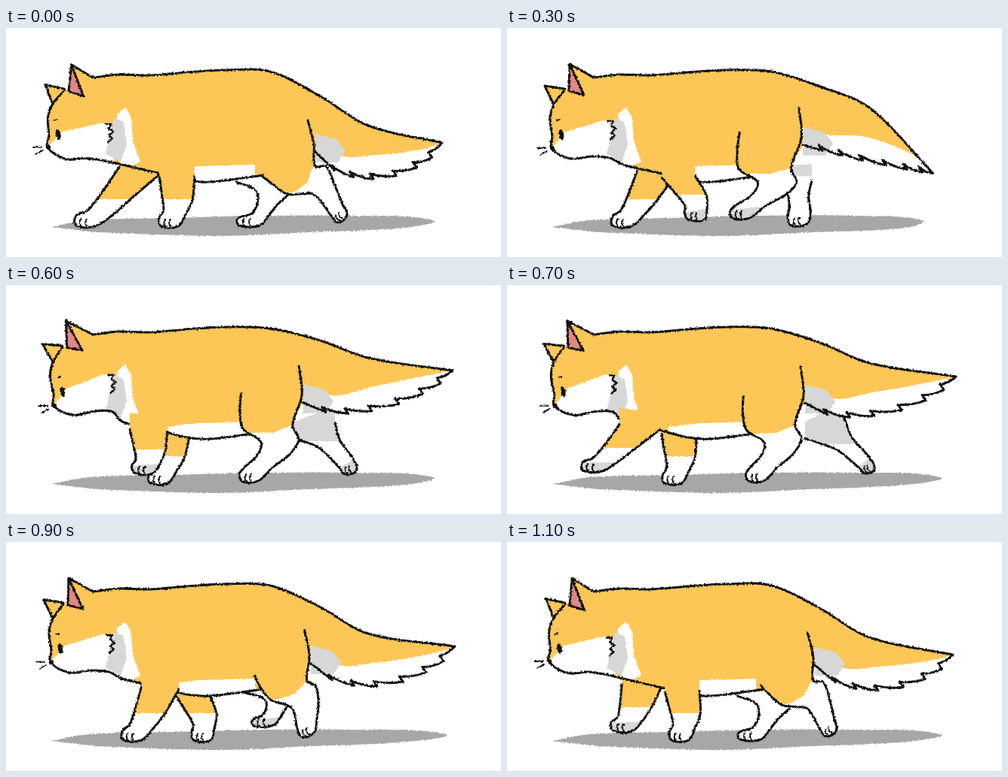
These frames come from a looping animation (656x305 px, 1.2 s). An HTML page:

```html
<!DOCTYPE html>
<html lang="en">
<head>
<meta charset="utf-8">
<title>Walk cycle</title>
<style>
html, body { margin: 0; width: 100%; height: 100%; overflow: hidden; background: #fff; }
svg { display: block; }
</style>
</head>
<body>
<svg width="656" height="305" viewBox="0 0 656 305">
  <filter id="crayon" x="0" y="0" width="656" height="305" filterUnits="userSpaceOnUse" color-interpolation-filters="sRGB">
    <feTurbulence id="grain" type="fractalNoise" baseFrequency=".4" numOctaves="2"/>
    <feDisplacementMap in="SourceGraphic" scale="3.5" xChannelSelector="R" yChannelSelector="G"/>
  </filter>
  <g id="stage" filter="url(#crayon)"></g>
</svg>
<script>
const ORANGE = '#fdc757', GREY = '#d7d7d8', PINK = '#e08886', SHADOW = '#a7a7a7', INK = '#111';
const STEPS = 12, STEP_MS = 100;

const parse = s => s.split(' ').map(p => p.split(',').map(Number));
const lerp = (a, b, k) => a.map((v, i) => v + (b[i] - v) * k);
const last = list => list[list.length - 1];
const move = ([x, y], dx, dy) => [x + dx, y + dy];
const clamp = v => Math.max(0, Math.min(1, v));

// Values at the key steps; a step between two keys takes their mean.
const KEYS = [0, 2, 4, 6, 7, 9, 11];
function track(values, step) {
  const i = KEYS.findLastIndex(k => k <= step);
  return KEYS[i] === step ? values[i] : (values[i] + values[i + 1]) / 2;
}

// Each leg blends a reaching and a trailing outline: down the front, round the paw, up the back.
const FRONT = {
  reach: parse('150,185 130,215 108,243 93,250 93,263 118,264 140,250 165,228 203,195'),
  trail: parse('224,203 236,222 248,243 246,254 249,264 271,264 276,248 279,229 268,199'),
  paw: 3, fold: 2
};
const FAR_HIND = {
  reach: parse('305,205 332,218 328,245 307,254 309,263 336,263 348,250 360,235 374,222'),
  trail: parse('395,208 425,220 440,228 466,254 474,263 487,257 480,238 457,206 447,177'),
  paw: 3, fold: 0
};
// The last three points bound the white of the thigh.
const NEAR_HIND = {
  reach: parse('306,135 302,160 303,186 328,207 318,228 287,250 289,262 312,263 335,245 365,228 381,210 374,187 389,145 386,105 376,186 345,195 310,193'),
  trail: parse('340,198 352,207 372,221 390,221 409,222 431,250 440,259 452,249 446,235 436,210 424,184 410,184 408,155 400,123 405,188 400,205 385,217'),
  paw: 5, fold: 0
};

// swing: 0 reaching to 1 trailing; lift: paw height.
const gait = {
  nearFront: { shape: FRONT, swing: [.72, 1, .88, .5, .05, .4, .8], lift: [0, 0, 18, 13, 16, 0, 0] },
  farFront: { shape: FRONT, swing: [0, .21, .4, .63, .74, 1, .31], lift: [0, 0, 0, 0, 0, 0, 12] },
  nearHind: { shape: NEAR_HIND, swing: [1, .13, 0, .16, .21, .69, .89], lift: [0, 18, 0, 0, 0, 0, 0] },
  farHind: { shape: FAR_HIND, swing: [0, .27, .55, .85, 1, .12, 0], lift: [0, 0, 0, 11, 12, 18, 0] }
};
const tailKeys = {
  x: [578, 541, 588, 592, 595, 595, 591],
  y: [153, 235, 152, 114, 122, 139, 150],
  middle: [130, 133, 79, 97, 104, 122, 127]
};

const BACK = parse('115,66 150,62 190,63 240,59 290,56 350,58');
const BELLY = parse('372,192 320,199 270,205 240,203 205,194 154,182');
const BELLY_WHITE = parse('214,189 255,184 330,182 330,198 270,205 240,203 214,197');
const CHEST = parse('147,115 158,106 166,120 168,150 178,178 168,183 152,182');
const SHADE = parse('0,-24 28,-17 40,-2 30,14 0,14');
const JAW = parse('136,173 112,171 84,174 59,160 60,145 57,121 62,102 76,83');
const EARS = parse('61,100 50,77 76,81 83,48 82,84 102,89');
const MASK = parse('78,138 102,131 127,123 142,123 150,180');
const NECK = parse('143,120 156,125 160,155 152,178 132,168');

// Smooth path through points, handles scaled to each span so it never overshoots.
function curve(pts) {
  const handle = (i, to) => {
    const p = pts[i], a = pts[i - 1] || p, b = pts[i + 1] || p;
    const k = Math.hypot(to[0] - p[0], to[1] - p[1]) / 3 / (Math.hypot(b[0] - a[0], b[1] - a[1]) || 1);
    const s = to === b ? k : -k;
    return [p[0] + (b[0] - a[0]) * s, p[1] + (b[1] - a[1]) * s];
  };
  return 'M' + pts[0] + pts.slice(1).map((p, i) => `C${handle(i, p)} ${handle(i + 1, pts[i])} ${p}`).join('');
}
const lines = pts => 'M' + pts.join('L');
const join = (...paths) => paths.join('').replace(/(?!^)M/g, 'L');
const fill = (d, color) => `<path d="${d}" fill="${color}"/>`;
const ink = (d, w = 3) =>
  `<path d="${d}" fill="none" stroke="${INK}" stroke-width="${w}" stroke-linecap="round" stroke-linejoin="round"/>`;

function poseLeg({ shape, swing, lift }, step) {
  const u = track(swing, step), up = track(lift, step);
  const pts = shape.reach.map((p, i) => {
    const [x, y] = lerp(p, shape.trail[i], u), low = clamp((y - 185) / 75);
    // A lifted front leg swings from a shoulder that is already ahead of the paw.
    return [x - shape.fold * up * (1 - low) * clamp(3 * u), y - up * low];
  });
  return { pts, u, up, paw: shape.paw };
}

function paw({ pts, up, paw: i }) {
  const a = pts[i + 1], b = pts[i + 2];
  const dx = b[0] - a[0], dy = b[1] - a[1], k = 9 / Math.hypot(dx, dy);
  const toes = [.25, .55].map(t => ink(
    `M${lerp(a, b, t)}q${-dx * k * .4 + dy * k * .5},${-dy * k * .4 - dx * k * .5} ${dy * k},${-dx * k}`, 2));
  return (up > 5 ? fill(lines(pts.slice(i, i + 4)), GREY) : '') + toes.join('');
}

function drawLeg(id, leg, top, split) {
  const { pts } = leg, at = split / 305;
  const root = lines([last(pts), pts[0]].map(p => move(p, 0, -22)));
  return `<linearGradient id="${id}" gradientUnits="userSpaceOnUse" x2="0" y2="305">
    <stop offset="${at}" stop-color="${top}"/><stop offset="${at}" stop-color="#fff"/></linearGradient>` +
    fill(join(curve(pts), root) + 'Z', `url(#${id})`) + paw(leg) + ink(curve(pts));
}
const drawFront = (id, leg) => drawLeg(id, leg, ORANGE, 228 - leg.up * .7);

function drawNearHind(leg) {
  const outline = leg.pts.slice(0, 14);
  return fill(curve(outline), ORANGE) +
    fill(join(curve(leg.pts.slice(2, 12)), lines(leg.pts.slice(14))), '#fff') +
    paw(leg) + ink(curve(outline));
}

function poseTail(step, rump) {
  const tip = [track(tailKeys.x, step), track(tailKeys.y, step)], mid = [480, track(tailKeys.middle, step)];
  // Points along an arc from the tip to the rump, passing below the middle of the tail.
  const arc = (drop, ks) => {
    const chord = lerp(tip, rump, (tip[0] - mid[0]) / (tip[0] - rump[0]));
    const sag = mid[1] + drop - chord[1];
    return ks.map(k => move(lerp(tip, rump, k), 0, sag * Math.sin(Math.PI * k) ** .6));
  };
  let from = tip;
  const fur = arc(72, [.08, .2, .36, .54, .7, .85]).map(tuft => {
    const notch = move(tuft, -5, -7), bend = move(lerp(from, notch, .5), 0, 4);
    from = tuft;
    return `Q${bend} ${notch}L${tuft}`;
  }).join('') + 'L' + rump;
  const base = move(lerp(last(BACK), mid, .5), 0, -4);
  return {
    spine: curve([...BACK, base, mid, tip]) + fur,
    white: curve([move(rump, 0, -24), ...arc(40, [.8, .55, .3, .1]), tip]) + fur
  };
}

function poseHead(step) {
  const tilt = .07 * Math.cos(2 * Math.PI * step / STEPS), c = Math.cos(tilt), s = Math.sin(tilt);
  const turn = ([x, y]) => [75 + (x - 75) * c - (y - 100) * s, 100 + (x - 75) * s + (y - 100) * c];
  return { jaw: JAW.map(turn), ears: EARS.map(turn), mask: MASK.map(turn), cheek: turn([134, 124]), eye: turn([72, 142]) };
}

function drawFace({ jaw, ears, cheek, eye: [ex, ey] }) {
  const [top, left, right] = ears.slice(3), [nx, ny] = jaw[3];
  return fill(lines([left, top, BACK[0], right]), ORANGE) + fill(lines([top, left, right]), PINK) +
    ink(lines([BACK[0], top, left, right, top])) +
    ink(`M${cheek}l7,0l-3,6l6,4l-6,5l5,4l-6,5`, 2.5) +
    `<ellipse cx="${ex}" cy="${ey}" rx="3.2" ry="7" transform="rotate(-10 ${ex} ${ey})" fill="${INK}"/>` +
    ink(`M${ex - 6},${ey - 19}l4,-1`, 2) +
    `<circle cx="${nx + 1}" cy="${ny}" r="3" fill="${INK}"/>` +
    ink(`M${nx - 19},${ny}l11,0M${nx - 15},${ny + 9}l9,-5`, 2);
}

function drawShadow(step) {
  const end = 566 - 15 * Math.sin(2 * Math.PI * step / STEPS);
  const outline = parse(`60,265 110,256 220,253 340,250 460,250 ${end},256 530,266 400,272 280,277 120,272`);
  return fill(curve(outline) + 'Z', SHADOW);
}

function draw(step) {
  const legs = {};
  for (const name in gait) legs[name] = poseLeg(gait[name], step);
  const rump = move(legs.nearHind.pts[12], 2, 10);
  const tail = poseTail(step, rump), head = poseHead(step), farEar = lines(head.ears.slice(0, 3));
  const under = curve([...BELLY, ...head.jaw]);

  stage.innerHTML = drawShadow(step) +
    drawLeg('farHind', legs.farHind, GREY, 186 + 26 * legs.farHind.u) +
    drawFront('farFront', legs.farFront) +
    fill(farEar, ORANGE) + ink(farEar) +
    fill(join(tail.spine, under) + 'Z', ORANGE) +
    fill(tail.white + 'Z', '#fff') +
    fill(lines(SHADE.map(p => move(rump, ...p))), GREY) +
    fill(lines(BELLY_WHITE), '#fff') +
    fill(lines(CHEST), '#fff') +
    fill(join(curve(head.jaw.slice(0, 4)), lines(head.mask)), '#fff') +
    fill(lines(NECK), GREY) +
    ink(tail.spine) + ink(under) +
    drawFront('nearFront', legs.nearFront) +
    drawNearHind(legs.nearHind) +
    drawFace(head);
  grain.setAttribute('seed', step + 1);
}

const stage = document.getElementById('stage'), grain = document.getElementById('grain');
const start = performance.now();
let shown = -1;
function tick() {
  const step = Math.floor((performance.now() - start) / STEP_MS) % STEPS;
  if (step !== shown) draw(shown = step);
  requestAnimationFrame(tick);
}
tick();
</script>
</body>
</html>
```
